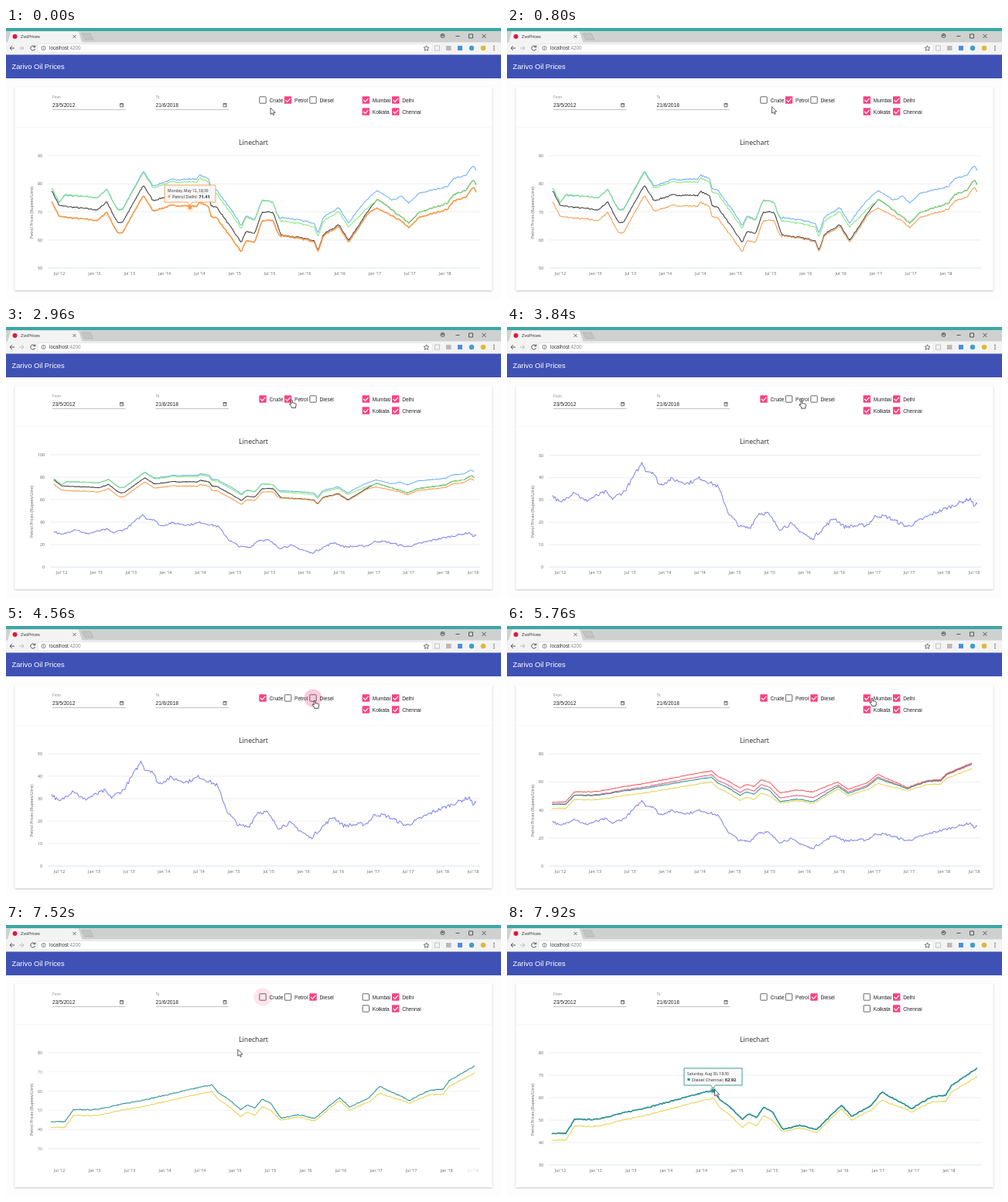
An HTML page that plays this animation: 640x350 px, repeating every 8 s.

```html
<!DOCTYPE html>
<html lang="en">
<head>
<meta charset="utf-8">
<title>Oil prices</title>
<style>
  html, body { margin: 0; width: 100%; height: 100%; overflow: hidden; background: #fdfdfd; }
  svg { display: block; width: 640px; height: 350px; }
  text { font-family: "Liberation Sans", Arial, sans-serif; }
  .chart text { font-family: "Noto Sans", "DejaVu Sans", sans-serif; }
  .tick { font-size: 5.2px; fill: #666; }
  .field { font-size: 6.6px; fill: #222; }
  .hint { font-size: 4.6px; fill: #8a8a8a; }
  .line { fill: none; stroke-linejoin: round; stroke-linecap: round; }
  .icon { fill: none; stroke: #555; }
</style>
</head>
<body>
<svg id="stage" viewBox="0 0 640 350">
  <defs>
    <filter id="shade" x="-5%" y="-5%" width="110%" height="115%">
      <feDropShadow dx="0" dy="1" stdDeviation="1" flood-opacity=".28"/>
    </filter>
  </defs>
  <g>
    <rect width="640" height="19" fill="#cfd1d1"/>
    <rect width="640" height="4" fill="#3aa8a6"/>
    <path d="M2 19L6 5.500Q6.500 4.500 8 4.500H92Q93.500 4.500 94 5.500L98.500 19Z" fill="#f3f3f3"/>
    <path d="M98 7H109L113 15H102Z" fill="#c3c5c5" stroke="#aaa" stroke-width=".6"/>
    <circle cx="11.500" cy="11" r="3" fill="#dd1b3d"/>
    <text x="19" y="13" font-size="5.600" fill="#333">ZvoPrices</text>
    <path class="icon" d="M86.500 9l4 4m0-4l-4 4" stroke-width=".8"/>
    <g class="icon">
      <circle cx="564.500" cy="10" r="2.500"/><circle cx="564.500" cy="9.500" r=".8" fill="#555"/>
      <path d="M581.500 10.500h5M598.500 8h5v5h-5zM615.500 8l5 5m0-5l-5 5"/>
    </g>
    <rect y="18.500" width="640" height="16.500" fill="#f3f3f3"/>
    <rect x="41" y="20.500" width="510" height="11.500" rx="1.500" fill="#fff" stroke="#d8d8d8" stroke-width=".6"/>
    <path class="icon" d="M11 26H5m2.800-2.800L5 26l2.800 2.800"/>
    <path class="icon" d="M17 26h6m-2.800-2.800L23 26l-2.800 2.800" style="stroke:#bbb"/>
    <path class="icon" d="M37.200 24.200a3 3 0 1 0 .4 2.800M37.800 22.500v2.200h-2.400"/>
    <circle class="icon" cx="48.500" cy="26" r="2.600" stroke-width=".7"/>
    <path class="icon" d="M48.500 25.500v2M48.500 24v.8" stroke-width=".7"/>
    <text x="56" y="28.200" font-size="6.300" fill="#333">localhost<tspan fill="#888">:4200</tspan></text>
    <path class="icon" stroke-width=".8" d="M543.500 22.700l1 2.300 2.500.2-1.900 1.600.6 2.500-2.200-1.300-2.200 1.300.6-2.500-1.900-1.600 2.500-.2z"/>
    <rect class="icon" x="554.500" y="23" width="6" height="6" style="stroke:#c5c5c5"/>
    <rect x="569" y="23" width="6.500" height="6" fill="#b8b8b8"/>
    <rect x="584" y="23" width="6" height="6" fill="#4a8fe0"/>
    <circle cx="602" cy="26" r="3.200" fill="#3f9fc8"/>
    <circle cx="617" cy="26" r="3.300" fill="#dcb93c"/>
    <g fill="#555"><circle cx="631" cy="23.500" r=".8"/><circle cx="631" cy="26" r=".8"/><circle cx="631" cy="28.500" r=".8"/></g>
  </g>
  <rect y="34.500" width="640" height="30.500" fill="#3f51b5"/>
  <text x="7.500" y="53" font-size="9.300" fill="#fff">Zarivo Oil Prices</text>
  <rect x="11.500" y="76" width="617" height="262.500" rx="1" fill="#fff" filter="url(#shade)"/>
  <path d="M12 128.500H628" stroke="#f5f5f5" stroke-width=".7"/>
  <g id="form"></g>
  <g class="chart">
    <text x="320" y="151" font-size="8.600" font-weight="500" fill="#333" text-anchor="middle">Linechart</text>
    <text transform="translate(34.500 238.500) rotate(-90)" font-size="5.300" fill="#666" text-anchor="middle">Petrol Prices (Rupees/Litre)</text>
    <g id="axes"></g>
    <g id="lines"></g>
    <g id="tips"></g>
  </g>
  <g id="cursor" stroke-linejoin="round">
    <path id="arrow" d="M0 0V8.500L2 6.800 3.300 9.600 4.700 9 3.500 6.300H6.200Z" fill="#fff" stroke="#222" stroke-width=".7"/>
    <path id="hand" d="M-.9.8Q0-.6.9.800V4L2.300 3.900 3.600 4.300 5 4.800Q5.800 5 5.700 6.500L5 9V10.300H-.3V9L-3 5.900Q-3 4.700-1.800 5.100L-.9 6Z" fill="#fff" stroke="#222" stroke-width=".8"/>
  </g>
</svg>
<script>
const LOOP = 8000, TOP = 165, BASE = 310;
const $ = id => document.getElementById(id);
const clamp = v => Math.max(0, Math.min(1, v));
const mix = (a, b, k) => a + (b - a) * k;
const ease = k => (1 - Math.cos(Math.PI * clamp(k))) / 2;

function set(el, attrs) {
  for (const k in attrs) el.setAttribute(k, attrs[k]);
  return el;
}
function add(parent, tag, attrs, text) {
  const el = set(document.createElementNS('http://www.w3.org/2000/svg', tag), attrs);
  if (text) el.textContent = text;
  return parent.appendChild(el);
}

/* Moments when the choices take effect */
const time = { crudeOn: 1840, petrolOff: 3360, dieselOn: 4640, mumbaiOff: 5920, kolkataOff: 6620, crudeOff: 7200 };

/* Prices: key points [half years since Jul 2012, rupees], roughened with seeded noise */
let seed = 7;
const rand = () => (seed = seed * 16807 % 2147483647) / 2147483647;
function at(points, x) {
  let i = 1;
  while (i < points.length - 1 && points[i][0] < x) i++;
  const [a, b] = [points[i - 1], points[i]];
  return mix(a[1], b[1], clamp((x - a[0]) / (b[0] - a[0])));
}
function rough(keys, amp) {
  const out = [], end = keys[keys.length - 1][0];
  for (let h = keys[0][0]; h < end; h += .035) out.push([h, at(keys, h) + (rand() - .5) * amp]);
  return out.concat([keys[keys.length - 1]]);
}
const petrol = rough([[-.22, 77.6], [0, 72.2], [1.1, 70.7], [1.35, 73.7], [1.65, 66.3], [1.8, 66.3], [2.4, 79.5],
  [2.67, 74], [3.2, 76], [3.93, 75.9], [4, 77.3], [4.26, 75.7], [4.33, 72.3], [4.5, 71.5], [5.19, 59.1], [5.32, 63],
  [5.58, 62.4], [5.78, 69.9], [6.1, 69.9], [6.31, 61.9], [7.28, 59.9], [7.37, 56.1], [7.53, 62], [7.97, 65.4],
  [8.26, 59.9], [8.65, 67.5], [9.07, 74.6], [9.98, 66], [10.26, 69.8], [11.08, 73.2], [11.24, 76.2], [11.6, 77.6],
  [11.81, 81.7], [11.88, 79.8]], .5);
const diesel = rough([[-.23, 44.1], [.16, 44.1], [.4, 50.3], [1, 50.3], [2.6, 56.2], [4.33, 63.4], [4.5, 59.3],
  [4.8, 55.9], [5.15, 50.3], [5.35, 53], [5.55, 51], [5.75, 55.9], [6, 53.8], [6.3, 45.8], [6.8, 47.7], [7.25, 45.7],
  [7.95, 56.6], [8.25, 51.7], [8.8, 56.6], [9.1, 62.4], [9.75, 57], [9.92, 55], [10.5, 60.3], [10.9, 61],
  [11.08, 65.5], [11.79, 73.1]], .5);
const crude = rough([[-.22, 32], [0, 28.5], [.4, 33.8], [.7, 29.5], [1.3, 33.6], [1.47, 30.5], [1.84, 33.8], [2.35, 46.8],
  [2.45, 43], [2.65, 42.5], [2.85, 36.5], [3.17, 39.3], [3.66, 37.4], [4, 39.8], [4.52, 36], [4.83, 23.8], [5.15, 18],
  [5.43, 17.5], [5.68, 24], [5.95, 24], [6.28, 17], [6.6, 19.2], [7.2, 12.4], [7.85, 22], [8.14, 18], [8.8, 18.8],
  [9.05, 23], [9.35, 22.5], [9.95, 18], [10.7, 24], [11.75, 30.6], [11.85, 27.6], [11.94, 28.3]], 1.7);
const spread = (base, gap) => base.map(([h, v]) => [h, v + at(gap, h)]);
const even = [[0, 0], [12, 0]];

const lines = [];
function series(data, color, from, to) {
  lines.push({ data, color, from, to, el: add($('lines'), 'path', { class: 'line', stroke: color }) });
}
const addPetrol = (gap, color) => series(spread(petrol, gap), color, -1000, time.petrolOff);
const addDiesel = (gap, color, to = LOOP) => series(spread(diesel, gap), color, time.dieselOn, to);
const orange = '#f79a4b', teal = '#2b908f';
addPetrol([[0, 1], [.15, 3.9], [5, 6.4], [6.2, 3.3], [6.35, 6.3], [8.5, 6], [9.1, 3], [9.5, 3.5], [9.75, 7.4], [11.9, 5]], '#6fb0f2');
addPetrol(even, '#3c3c42');
addPetrol([[0, 1], [.15, 4.2], [5.4, 5], [6.2, 3.3], [6.35, 5.1], [8.3, 4.6], [9, 0]], '#83e97a');
addPetrol([[0, -3.9], [2.4, -3.6], [4.3, -3.9], [6.2, -2.8], [6.35, -.2], [8.8, -.8], [9.1, -3.3], [9.7, -1.5], [11.9, -2.6]], orange);
series(crude, '#8085e9', time.crudeOn, time.crudeOff);
addDiesel([[0, 0], [4.3, 1.7], [7.3, 3], [8, 1], [9.1, 1], [10, 0], [11.8, -.7]], '#f15c80', time.kolkataOff);
addDiesel([[0, -3], [4.3, -3.5], [6, -3.8], [6.3, -1], [8.7, -1.8], [9.1, -3.6], [9.9, -1.5], [11.8, -3.8]], '#e4d354');
addDiesel(even, teal);
addDiesel([[0, 1.4], [.4, 2.4], [4.3, 4.5], [7.3, 7], [8, 3], [9.1, 2.8], [10, .7], [11.8, .3]], '#f45b5b', time.mumbaiOff);

/* Axis views; end is the last point in half years */
const views = [
  { from: 0, low: 50, high: 90, tick: 10, end: 11.88 },
  { from: time.crudeOn, low: 0, high: 100, tick: 20, end: 11.94 },
  { from: time.petrolOff, low: 0, high: 50, tick: 10, end: 11.94 },
  { from: time.dieselOn, low: 0, high: 80, tick: 20, end: 11.94 },
  { from: time.crudeOff, low: 30, high: 80, tick: 10, end: 11.79 }
];
for (const v of views) {
  v.x0 = v.high < 100 ? 69 : 72;
  v.step = (607.5 - v.x0) / v.end;
  v.last = v.end > 11.9 ? 1 : 0;
  v.rows = [];
  for (let n = v.low; n <= v.high; n += v.tick) {
    const g = add($('axes'), 'g', {});
    v.rows.push({ n, g, rule: add(g, 'path', { stroke: n === v.low ? '#ccd6eb' : '#e6e6e6', 'stroke-width': .7 }),
      label: add(g, 'text', { class: 'tick', 'text-anchor': 'end' }, String(n)) });
  }
}
const months = Array.from({ length: 13 }, (_, i) => add($('axes'), 'text',
  { class: 'tick', y: 319, 'text-anchor': 'middle' }, (i % 2 ? 'Jan' : 'Jul') + " '" + (12 + Math.ceil(i / 2))));

function drawChart(t) {
  const i = views.filter(v => v.from <= t).length - 1;
  const now = views[i], old = views[Math.max(0, i - 1)];
  const k = i ? ease((t - now.from) / 500) : 1;
  const [x0, step, low, high, last] = ['x0', 'step', 'low', 'high', 'last'].map(p => mix(old[p], now[p], k));
  const X = h => x0 + h * step;
  const Y = v => BASE - (v - low) / (high - low) * (BASE - TOP);

  for (const v of views) for (const { n, g, rule, label } of v.rows) {
    const y = Y(n), inside = y > TOP - 1 && y < BASE + 1;
    set(g, { opacity: !inside ? 0 : v === now ? k : v === old ? 1 - k : 0 });
    set(rule, { d: `M${x0 - 15} ${y}H613` });
    set(label, { x: x0 - 22, y: y + 2 });
  }
  months.forEach((el, m) => set(el, { x: Math.min(X(m), 604), opacity: m < 12 ? 1 : last }));

  for (const s of lines) {
    const edge = 56 + 560 * ease((t - s.from) / 700);
    const shown = t >= s.from && t < s.to ? s.data.filter(p => X(p[0]) <= edge) : [];
    const hover = tips.some(p => p.color === s.color && t >= p.from && t < p.to);
    set(s.el, {
      d: shown.map(([h, v], j) => (j ? 'L' : 'M') + X(h).toFixed(2) + ' ' + Y(v).toFixed(2)).join(''),
      'stroke-width': hover ? 1.7 : 1.05
    });
  }
}

/* Tooltips */
function tip(from, to, color, x, y, w, px, py, round, head, name, value) {
  const g = add($('tips'), 'g', {}), mid = px - x;
  const dot = (cx, cy, r) => round
    ? add(g, 'circle', { cx, cy, r, fill: color })
    : add(g, 'rect', { x: cx - r, y: cy - r, width: 2 * r, height: 2 * r, fill: color });
  add(g, 'circle', { cx: px, cy: py, r: 4.6, fill: color, opacity: .25 });
  dot(px, py, 2.3);
  add(g, 'path', { d: `M${x} ${y}h${w}v22h${mid - w + 3}l-3 4-3-4h${3 - mid}z`, fill: '#f9f9f9',
    'fill-opacity': .9, stroke: color, 'stroke-width': .9 });
  add(g, 'text', { x: x + 4, y: y + 9, 'font-size': 4.9, fill: '#333' }, head);
  dot(x + 6, y + 14.5, 1.6);
  const line = add(g, 'text', { x: x + 10, y: y + 16.5, 'font-size': 5.7, fill: '#333' }, name + ': ');
  add(line, 'tspan', { 'font-weight': 700 }, value);
  return { g, from, to, color };
}
const tips = [
  tip(-1000, 480, orange, 205, 203, 66, 238, 232, true, 'Monday, May 12, 18:30', 'Petrol Delhi', '71.41'),
  tip(7720, 9000, teal, 229, 185, 75, 266.5, 214, false, 'Saturday, Aug 30, 18:30', 'Diesel Chennai', '62.92')
];

/* Form */
function dateField(x, name, value) {
  const f = $('form');
  add(f, 'text', { class: 'hint', x, y: 91 }, name);
  add(f, 'text', { class: 'field', x, y: 102 }, value);
  add(f, 'path', { d: `M${x} 105.500h94.500`, stroke: '#999', 'stroke-width': .6 });
  add(f, 'path', { d: `M${x + 87.5} 97.500h4v4.300h-4zm0 .8h4m-1.800 2h.9`, fill: 'none', stroke: '#555', 'stroke-width': .8 });
}
dateField(60, 'From', '23/5/2012');
dateField(193.5, 'To', '21/6/2018');

function box(name, x, y, checked, ...flips) {
  const p = $('form');
  const ripple = add(p, 'circle', { cx: x, cy: y, fill: '#ff4081' });
  const off = add(p, 'rect', { x: x - 4.2, y: y - 4.2, width: 8.4, height: 8.4, rx: .6, fill: 'none', stroke: '#666' });
  const full = add(p, 'g', {});
  add(full, 'rect', { x: x - 4.7, y: y - 4.7, width: 9.4, height: 9.4, rx: .8, fill: '#ff4081' });
  add(full, 'path', { d: `M${x - 3} ${y}l2.200 2.300 4-4.500`, fill: 'none', stroke: '#fff', 'stroke-width': 1.2 });
  add(p, 'text', { class: 'field', x: x + 8.5, y: y + 2.5 }, name);
  return { ripple, off, full, checked, flips };
}
const boxes = [
  box('Crude', 332, 93, 0, time.crudeOn, time.crudeOff),
  box('Petrol', 364.5, 93, 1, time.petrolOff),
  box('Diesel', 397, 93, 0, time.dieselOn),
  box('Mumbai', 465.3, 93, 1, time.mumbaiOff),
  box('Delhi', 503.7, 93, 1),
  box('Kolkata', 465.3, 108, 1, time.kolkataOff),
  box('Chennai', 503.7, 108, 1)
];
const PRESS = 200;
function drawBoxes(t) {
  for (const b of boxes) {
    const on = (b.checked + b.flips.filter(f => t >= f).length) % 2;
    set(b.full, { opacity: on });
    set(b.off, { opacity: 1 - on });
    const age = t - (b.flips.map(f => f - PRESS).filter(p => t >= p).pop() ?? -9999);
    set(b.ripple, { r: 11.5 * ease(age / 120), opacity: .27 * (1 - clamp((age - 380) / 300)) });
  }
}

/* Pointer rests: place, arrival, departure */
const rests = [
  { x: 342, y: 103, from: 0, to: 640 },
  { x: 347, y: 89, from: 1440, to: 1960 },
  { x: 369.5, y: 94, from: 2600, to: 3500 },
  { x: 399, y: 96, from: 4300, to: 4800 },
  { x: 472, y: 93, from: 5600, to: 6000 },
  { x: 466.5, y: 108.5, from: 6400, to: 6820 },
  { x: 340, y: 94, from: 7080, to: 7240 },
  { x: 268.5, y: 212.5, from: 7760, to: LOOP }
];
function drawCursor(t) {
  const i = rests.filter(r => r.from <= t).length - 1;
  const a = rests[i], b = rests[i + 1] || a;
  const k = t > a.to ? ease((t - a.to) / (b.from - a.to)) : 0;
  const x = mix(a.x, b.x, k), y = mix(a.y, b.y, k);
  const link = x > 325 && x < 425 && y < 99 || x > 459 && x < 538 && y < 114;
  set($('cursor'), { transform: `translate(${x} ${y})` });
  set($('hand'), { opacity: link ? 1 : 0 });
  set($('arrow'), { opacity: link ? 0 : 1 });
}

function draw(t) {
  drawChart(t);
  drawBoxes(t);
  drawCursor(t);
  for (const p of tips)
    set(p.g, { opacity: clamp((t - p.from) / 100) * (1 - clamp((t - p.to) / 200)) });
}
const start = performance.now();
function frame() {
  draw((performance.now() - start) % LOOP);
  requestAnimationFrame(frame);
}
frame();
</script>
</body>
</html>
```
